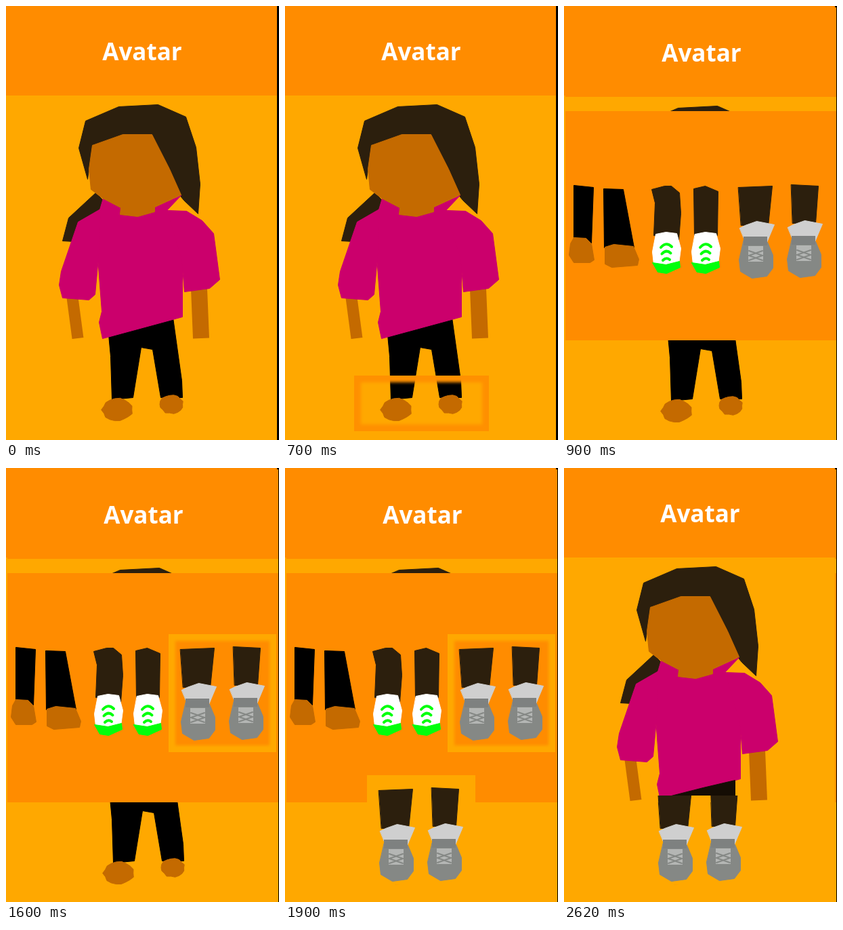
These frames come from a looping animation (403 by 640 pixels, 2.9 s). An HTML page with a canvas:

```html
<!DOCTYPE html>
<html lang="en">
<head>
<meta charset="utf-8">
<title>Avatar</title>
<style>
html, body { margin: 0; width: 100%; height: 100%; overflow: hidden; background: #ffa800; }
canvas { display: block; }
</style>
</head>
<body>
<canvas id="stage" width="403" height="640"></canvas>
<script>
const ctx = document.getElementById('stage').getContext('2d');
const AMBER = '#ffa800', ORANGE = '#ff8c00', SKIN = '#c46a00', HAIR = '#2c1f0d',
      PINK = '#cb006c', GREEN = '#00ff0c', GREY = '#858885';
const LOOP = 2900;
const CUTS = { marked: 700, picker: 900, chosen: 1600, preview: 1900, dressed: 2200 };

function at(x, y, draw) {
  ctx.save();
  ctx.translate(x, y);
  draw();
  ctx.restore();
}

function clipped(x, y, w, h, draw) {
  ctx.save();
  ctx.beginPath();
  ctx.rect(x, y, w, h);
  ctx.clip();
  draw();
  ctx.restore();
}

function rect(color, x, y, w, h) {
  ctx.fillStyle = color;
  ctx.fillRect(x, y, w, h);
}

// Filled shape whose points are the outermost pixels it covers
function poly(color, points) {
  const path = new Path2D(`M${points}Z`);
  at(0.5, 0.5, () => {
    ctx.fillStyle = ctx.strokeStyle = color;
    ctx.lineWidth = 1;
    ctx.fill(path);
    ctx.stroke(path);
  });
}

function line(color, width, d, cap = 'round') {
  ctx.strokeStyle = color;
  ctx.lineWidth = width;
  ctx.lineCap = cap;
  ctx.stroke(new Path2D(d));
}

// Rough-edged oval
function blob(color, x, y, rx, ry, seed) {
  const points = [];
  for (let i = 0; i < 18; i++) {
    const noise = Math.abs(Math.sin((i + seed) * 127.1) * 43758.5) % 1;
    const a = i / 18 * 2 * Math.PI, r = 0.88 + 0.16 * noise;
    points.push([x + rx * r * Math.cos(a), y + ry * r * Math.sin(a)]);
  }
  poly(color, points.join(' '));
}

// Rectangular marker, crisp outside and soft inside
function marker(color, x, y, w, h, band) {
  clipped(x, y, w, h, () => {
    ctx.filter = 'blur(2px)';
    ctx.strokeStyle = color;
    ctx.lineWidth = 2 * band;
    ctx.strokeRect(x, y, w, h);
  });
}

function backdrop() {
  rect(AMBER, 0, 0, 400, 640);
  rect(ORANGE, 0, 0, 400, 132);
  ctx.fillStyle = '#fff';
  ctx.font = 'bold 35px "Open Sans", "Noto Sans", sans-serif';
  ctx.textAlign = 'center';
  ctx.fillText('Avatar', 201, 80);
}

function head() {
  poly(HAIR, '132,275 143,286 138,300 106,318 101,347 83,346 92,312');
  poly(HAIR, '107,209 117,169 166,148 224,145 265,163 280,208 286,262 283,306 262,286 200,210 127,204 120,255');
}

function face() {
  poly(SKIN, '127,205 172,189 215,189 241,240 258,278 219,296 219,303 194,310 168,307 169,297 142,283 125,270 122,240');
}

function legs() {
  poly('#000', '151,484 246,459 259,552 260,577 228,577 216,506 199,503 187,577 156,580 154,516');
  blob(SKIN, 164, 595, 23, 17, 1);
  blob(SKIN, 244, 587, 18, 14, 4);
}

function shirt() {
  line(SKIN, 17, 'M98,430L106,490', 'butt');
  line(SKIN, 24, 'M285,417L288,490', 'butt');
  poly(PINK, '143,283 194,308 258,279 237,301 260,374 260,458 142,490 137,466 141,450 135,371 138,300');
  poly(PINK, '139,299 106,318 81,391 78,411 83,430 122,433 131,425 137,360');
  poly(PINK, '237,301 266,302 289,316 306,335 315,403 300,416 263,421 259,374');
}

function avatar() {
  backdrop();
  head();
  legs();
  shirt();
  face();
}

function bareFeet() {
  poly('#000', '14,264 43,267 40,349 14,343');
  poly('#000', '58,269 87,270 103,356 59,356');
  poly(SKIN, '14,341 32,342 40,350 44,374 38,378 14,378 7,367 9,350');
  poly(SKIN, '60,355 73,351 102,354 110,373 108,382 70,385 60,380');
}

function greenShoe() {
  poly('#fff', '135,336 150,333 166,335 172,357 169,380 132,380 130,362');
  poly(GREEN, '130,378 150,381 170,376 171,385 151,394 138,392');
  for (let i = 0; i < 3; i++) {
    const half = 8 - 1.5 * i;
    line(GREEN, 4, `M${151 - half},${356 + 9.5 * i}q${half},${i * 2 - 9} ${2 * half},-1`);
  }
}

function greenPair() {
  poly(HAIR, '129,270 148,265 158,265 170,275 172,305 169,345 132,338 134,290');
  poly(HAIR, '191,269 208,265 227,273 226,338 192,338');
  greenShoe();
  at(58, 0, greenShoe);
}

function greyShoe() {
  poly(GREY, '265,345 300,348 308,367 308,386 299,398 277,401 260,391 258,374');
  poly('#cfcfcf', '259,327 267,323 284,317 310,322 299,348 266,344');
  rect('#7e8180', 265, 340, 35, 13);
  rect('#b4b6b4', 272, 354, 22, 23);
  for (const y of [361, 368]) line(GREY, 2, `M273,${y}l20,7m0,-7l-20,7`);
}

function greyPair() {
  poly(HAIR, '257,267 307,265 301,324 261,323');
  poly(HAIR, '335,263 375,265 371,320 337,320');
  greyShoe();
  at(71, -1, greyShoe);
}

function picker(t) {
  avatar();
  clipped(2, 2, 400, 638, () => {
    at(2, 2, avatar);
    rect(ORANGE, 2, 155, 400, 338);
    if (t >= CUTS.chosen) marker(AMBER, 240, 245, 159, 174, 10);
    bareFeet();
    greenPair();
    greyPair();
    if (t >= CUTS.preview) {
      rect(AMBER, 121, 453, 160, 161);
      at(-119, 208, greyPair);
    }
  });
}

function dressed(t) {
  picker(t);
  clipped(2, 53, 398, 440, () => {
    avatar();
    poly('#150d04', '158,483 205,471 252,460 252,483');
    clipped(121, 483, 150, 10, () => {
      rect(AMBER, 121, 483, 150, 10);
      at(-119, 208, greyPair);
    });
  });
}

function draw(t) {
  rect('#000', 0, 0, 403, 640);
  if (t >= CUTS.dressed) return dressed(t);
  if (t >= CUTS.picker) return picker(t);
  avatar();
  if (t >= CUTS.marked) marker('#ff9000', 102, 545, 199, 82, 10);
}

const start = performance.now();
function tick() {
  draw((performance.now() - start) % LOOP);
  requestAnimationFrame(tick);
}
tick();
</script>
</body>
</html>
```
